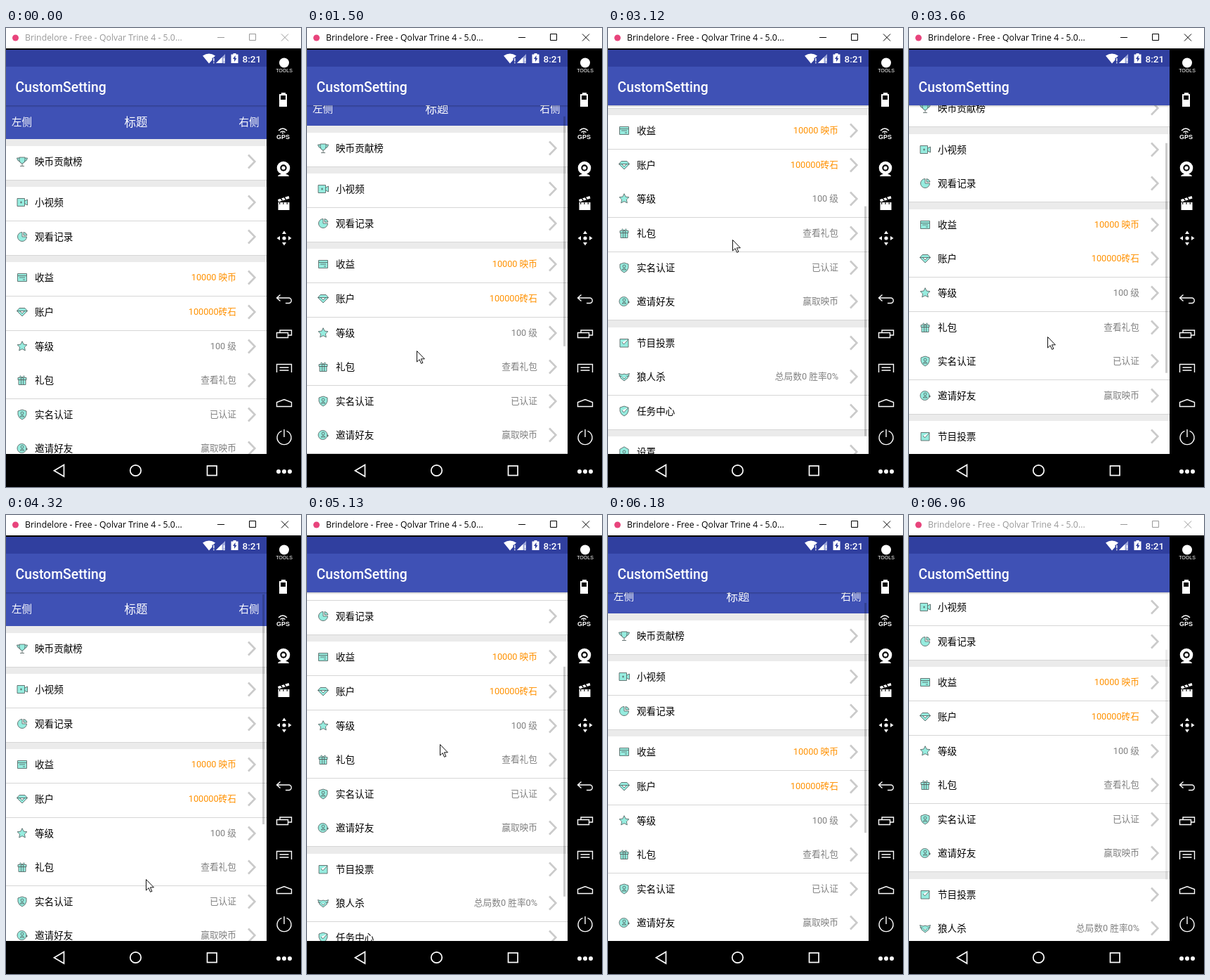
An HTML page for the animation above (7060 ms loop, 420 by 653 pixels).

```html
<!DOCTYPE html>
<html lang="zh-CN">
<head>
<meta charset="utf-8">
<title>CustomSetting</title>
<style>
html, body { margin: 0; width: 100%; height: 100%; overflow: hidden; background: #000; }
svg { display: block; }
text { font-family: Roboto, "Noto Sans CJK SC", "Noto Sans CJK", sans-serif; }
.caption { font: 12.3px "Open Sans", "Noto Sans", sans-serif; }
.label { font-size: 13.6px; font-weight: 500; }
.value { font-size: 12.7px; fill: #808080; text-anchor: end; }
.money { fill: #ff9100; }
.bar text { fill: #fff; }
.chevron { fill: none; stroke: #cacaca; stroke-width: 2.6; }
.icon { fill: #96ecdf; stroke: #536160; stroke-width: .85; stroke-linejoin: round; }
.line { fill: none; stroke: #fff; stroke-width: 1.4; }
.nav { stroke-width: 1.7; }
.side { fill: #fff; }
.hole { fill: #000; }
.tiny { font: 7px "Liberation Sans", sans-serif; text-anchor: middle; }
.gps { font-size: 9px; font-weight: bold; }
</style>
</head>
<body>
<svg width="420" height="653" viewBox="0 0 420 653">
  <defs>
    <clipPath id="view"><rect y="110" width="371" height="496"/></clipPath>
    <linearGradient id="shade" x2="0" y2="1">
      <stop stop-opacity=".22"/><stop offset="1" stop-opacity="0"/>
    </linearGradient>
    <path id="arrow" d="M0-10.500l3 4.500h-6z"/>
    <path id="bang" d="M0 0v4.500M0 5.800v1.400" stroke="#fff" stroke-width="1.400"/>
  </defs>
  <rect width="420" height="653"/>

  <g clip-path="url(#view)">
    <rect y="110" width="371" height="496" fill="#ebebeb"/>
    <g id="head" class="bar">
      <rect width="371" height="48" fill="#3f51b5"/>
      <text x="8" y="29" font-size="14.5">左侧</text>
      <text x="185" y="29.500" font-size="16.500" text-anchor="middle">标题</text>
      <text x="360.500" y="29" font-size="14.500" text-anchor="end">右侧</text>
    </g>
    <g id="list"></g>
    <rect id="thumb" x="365" width="3" height="327" fill-opacity=".2"/>
    <rect y="110" width="371" height="3" fill="url(#shade)"/>
  </g>

  <!-- window caption -->
  <rect width="420" height="29" fill="#fff"/>
  <circle cx="13.500" cy="14" r="4.500" fill="#e8447c"/>
  <g id="caption">
    <text class="caption" x="27" y="18">Brindelore - Free - Qolvar Trine 4 - 5.0...</text>
    <path id="buttons" d="M301 13.500h10M346.500 8.500h9v9h-9zM392 8.500l10 10m0-10l-10 10" fill="none"/>
  </g>

  <!-- status and action bars -->
  <g class="bar">
    <rect y="31" width="371" height="24" fill="#303f9f"/>
    <rect y="55" width="371" height="55" fill="#3f51b5"/>
    <path d="M280 39.500Q289 33.500 298 39.500L295 42.500h-1.500v3L289 50.500z" fill="#fff"/>
    <use href="#bang" x="295.800" y="43"/>
    <path d="M299 50l13-13v13z" fill="#9fa8da"/>
    <path d="M299 50l8.500-8.500V50z" fill="#fff"/>
    <use href="#bang" x="310.500" y="43"/>
    <path d="M320.500 37.500h3V36h4v1.500h3V50h-10z" fill="#fff"/>
    <path d="M326.500 39l-3.500 5h2v4l3.500-5h-2z" fill="#303f9f"/>
    <text x="336.500" y="48.500" font-size="13.500" font-weight="500">8:21</text>
    <text x="13.500" y="90.500" font-size="19.400" font-weight="500">CustomSetting</text>
  </g>

  <!-- navigation bar -->
  <g class="line nav">
    <path d="M82.500 621.500v16.500l-14-8.200z"/>
    <circle cx="184.500" cy="629.500" r="7.700"/>
    <rect x="286.500" y="623" width="13.500" height="13.500"/>
  </g>

  <!-- emulator tools, each drawn around its own centre -->
  <g class="side" transform="translate(396 0)">
    <circle cy="49.500" r="7"/>
    <text class="tiny" y="63">TOOLS</text>
    <path d="M-4 92h6v2h2v18h-11V94h3z"/>
    <rect class="hole" x="-5" y="96" width="7" height="6"/>
    <path class="line" d="M-8 146q6-6 12 0m-9.500 2.500q3.500-3 7 0"/>
    <circle cx="-2" cy="149.500" r="1"/>
    <text class="tiny gps" x="-1.500" y="158">GPS</text>
    <g transform="translate(-1 199)">
      <circle r="9.300"/><circle class="hole" r="4.700"/><circle r="2.600"/>
      <path d="M-8 12q1-3.500 8-3.500t8 3.500z"/>
    </g>
    <path d="M-8.500 248h16v11h-16zm-.5-4l15.500-5 1 3.500-15.500 5z"/>
    <path d="M-5 242l2.500 3.500m2.500-5l2.500 3.500" stroke="#000" stroke-width="1.300"/>
    <path d="M-7 249.500H7" stroke="#000" stroke-width="2.500" stroke-dasharray="1.300 4"/>
    <g id="move" transform="translate(0 299)"><circle r="2.600"/></g>
    <g class="line">
      <path d="M-5.500 379.500l-5 4.500 5 4.500M-10 384H6.500a3.700 3.700 0 0 1 0 7.500H2"/>
      <path d="M-10.500 433.500h16v7h-16zM-6 433v-3h16.500v7H6"/>
      <path d="M-10.500 490v-11.500h21V490m-17-7h13m-13 4h13"/>
      <path d="M-10.500 538.500v-6l10.500-4 10.500 4v6z"/>
      <path d="M-3.500 573.300a10 10 0 1 0 7 0M0 571v11"/>
    </g>
    <path d="M-8 631h16.100" stroke="#fff" stroke-width="6" stroke-linecap="round" stroke-dasharray="0 8"/>
  </g>

  <path id="cursor" d="M.5.500v15.500l3.600-3.400 2.500 5.700 2.300-1-2.500-5.500h5z" fill="#fff" stroke="#111"/>
</svg>

<script>
const LOOP = 7060, START = 830, STEP = 133.5;
const TOP = 110, PITCH = 48.65, GAP = 9.66, HEAD = 48.3;
const $ = id => document.getElementById(id);
const place = (el, x, y) => el.setAttribute('transform', `translate(${x} ${y})`);

for (let turn = 0; turn < 360; turn += 90)
  $('move').innerHTML += `<use href="#arrow" transform="rotate(${turn})"/>`;

// icon parts, centred on 0,0
const box = (x, y, w, h) => `M${x} ${y}h${w}v${h}h${-w}z`;
const ring = (x, y, r) => `M${x - r} ${y}a${r} ${r} 0 1 1 ${2 * r} 0a${r} ${r} 0 1 1 ${-2 * r} 0`;
const poly = (n, radius) => 'M' + Array.from({ length: n }, (_, i) => {
  const a = i * 2 * Math.PI / n, r = radius(i);
  return `${(r * Math.sin(a)).toFixed(1)} ${(-r * Math.cos(a)).toFixed(1)}`;
}).join('L') + 'z';
const shield = 'M0-7L6-5V0Q5 5 0 7-5 5-6 0V-5z';
const person = ring(0, -2, 2) + 'M-3 3q3-4 6 0z';
const check = 'M-3-1l2.500 3L6-5';

const icons = {
  cup: 'M-4-6h8v4q0 4-4 5-4-1-4-5zm0 1h-3.500q.5 4 4 5M4-5h3.500q-.5 4-4 5M0 3v3m-3 .5h6',
  video: box(-7, -5.5, 10.5, 11) + 'M3.500-2l4-2v8l-4-2M-3 0h3m-1.500-1.500v3',
  pie: 'M0-6.500a6.500 6.500 0 1 0 6.500 6.500H0zM2-6.500a6 6 0 0 1 5 4.500H2z',
  card: box(-6.5, -5.5, 13, 11) + 'M-6.500-2.500h13M-4 0h8M1 3h3',
  gem: 'M-4-5.500h8l3.500 4L0 6l-7.500-7.500zM-7.500-1.500h15m-11 0L0 2l3.500-3.500',
  star: poly(10, i => i % 2 ? 3.6 : 7.3),
  gift: box(-6, -3.5, 12, 3) + box(-5, -.5, 10, 7) + 'M-1.500-3.500v10m3-10v10M0-3.500Q-3-8-3.500-4.500M0-3.500Q3-8 3.500-4.500',
  id: shield + person,
  invite: ring(-.5, 0, 6.5) + person + 'M5 1h3M6.500-.5v3',
  vote: box(-6, -5.5, 12, 11.5) + check,
  wolf: 'M-7.500-4.500L-3-3l3-1 3 1 4.500-1.500L5 2 0 6l-5-4zM-7.500-1l4 .5m11-.5l-4 .5M-2.500 1L0 3l2.500-2',
  task: shield + check,
  gear: poly(6, () => 7.2) + ring(0, 0, 2)
};

const sections = [
  [['映币贡献榜', 'cup']],
  [['小视频', 'video'], ['观看记录', 'pie']],
  [['收益', 'card', '10000 映币', 'money'], ['账户', 'gem', '100000砖石', 'money'], ['等级', 'star', '100 级'],
   ['礼包', 'gift', '查看礼包'], ['实名认证', 'id', '已认证'], ['邀请好友', 'invite', '赢取映币']],
  [['节目投票', 'vote'], ['狼人杀', 'wolf', '总局数0 胜率0%'], ['任务中心', 'task']],
  [['设置', 'gear']]
];

const rows = [];
let next = HEAD;
for (const section of sections) {
  next += GAP;
  for (const [label, icon, value = '', kind = ''] of section) {
    const g = document.createElementNS('http://www.w3.org/2000/svg', 'g');
    g.innerHTML = `<rect width="371" height="49" fill="#fff"/>
      <rect y="48" width="371" height="1" fill="#d6d6d6"/>
      <path class="icon" d="${icons[icon]}" transform="translate(23 22)"/>
      <text class="label" x="41" y="27">${label}</text>
      <text class="value ${kind}" x="328" y="26">${value}</text>
      <path class="chevron" d="M345 12.500l9.300 9.500-9.300 9.500"/>`;
    $('list').append(g);
    rows.push({ g, y: next });
    next += PITCH;
  }
}
const MAX = next + GAP - 496;

const scrollKeys = [[3, 0], [5, 19], [11, MAX], [16, MAX], [21, 75.5], [24, 0], [31, 0], [32, 153],
  [35, 220], [36, 220], [40, 18], [42, 18], [44, 117]];
const pointerKeys = [[0, 277, 544], [3, 157, 498], [5, 156, 459], [11, 133, 220], [16, 172, 266],
  [21, 197, 439], [24, 200, 530], [31, 195, 487], [32, 189, 326], [35, 187, 259], [36, 187, 350], [39, 190, 520]];
const thumbKeys = [[3, 0], [4, 1], [29, 1], [31, 0], [32, 1], [44, 1], [45, .35]];

function at(keys, step) {
  const i = keys.findIndex(k => k[0] > step);
  if (i < 1) return keys.at(i).slice(1);
  const a = keys[i - 1], b = keys[i], p = (step - a[0]) / (b[0] - a[0]);
  return a.map((v, n) => v + (b[n] - v) * p).slice(1);
}

function draw(now) {
  const t = now % LOOP, step = Math.floor((t - START) / STEP);
  const [scroll] = at(scrollKeys, step), [x, y] = at(pointerKeys, step);
  place($('head'), 0, Math.round(TOP - scroll));
  for (const row of rows) place(row.g, 0, Math.round(TOP + row.y - scroll));
  $('thumb').setAttribute('y', TOP + 3 + scroll * .672);
  $('thumb').setAttribute('opacity', at(thumbKeys, step)[0]);
  place($('cursor'), Math.round(x), Math.round(y));
  $('cursor').setAttribute('visibility', step >= 0 && step < 40 ? 'visible' : 'hidden');
  const ink = t >= 1350 && t < 6960 ? '#000' : '#999';
  $('caption').setAttribute('fill', ink);
  $('buttons').setAttribute('stroke', ink);
  requestAnimationFrame(() => draw(performance.now()));
}
draw(0);
</script>
</body>
</html>
```
